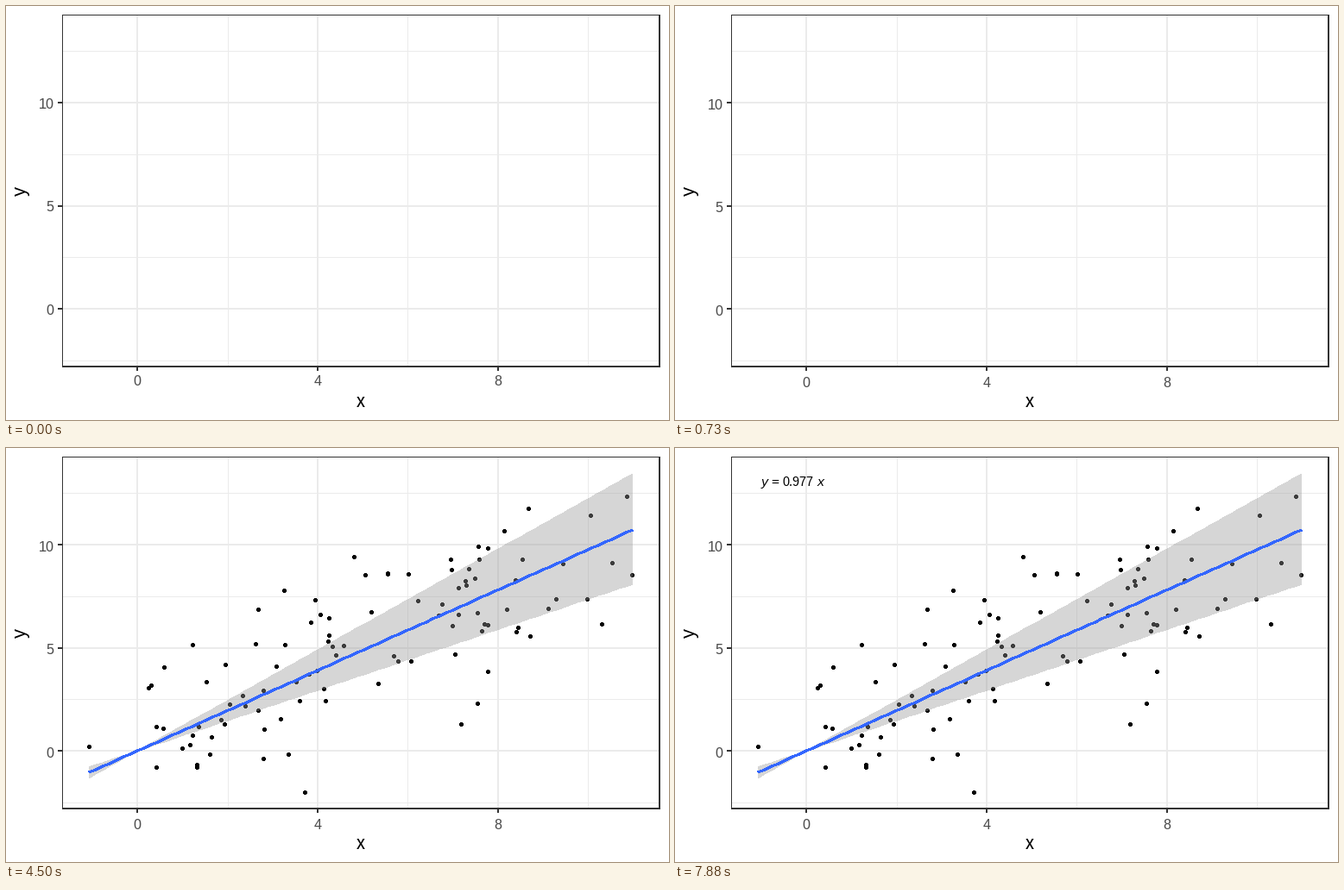
Animation of 768 by 480 pixels, one loop 8000 ms. Source, as a matplotlib script:

```python
import matplotlib.pyplot as plt
import numpy as np
from matplotlib.animation import FuncAnimation
from matplotlib.collections import PolyCollection

W, H, DPI = 768, 480, 96
LOOP, STEP = 8000, 10
PX = 72 / DPI  # points per pixel

# Times at which the plot changes, in ms
SETTLE, DOTS, FIT, EQUATION = 130, 1130, 4500, 7880

GRID, DARK, LABEL = "#EBEBEB", "#333333", "#4D4D4D"
X0, Y0 = 152, 351.3  # pixel position of the data origin

plt.rcParams.update({
    "font.family": "Liberation Sans",
    "text.hinting": "native",
    "text.hinting_factor": 1,
})

fig = plt.figure(figsize=(W / DPI, H / DPI), dpi=DPI, facecolor="white")
ax = fig.add_axes([0, 0, 1, 1])
ax.set(xlim=(0, W), ylim=(H, 0))
ax.set_axis_off()


def boxes(rects, color):
    """Fill crisp pixel rectangles given as (x, y, width, height)."""
    polys = [[(x, y), (x + w, y), (x + w, y + h), (x, y + h)]
             for x, y, w, h in rects]
    art = PolyCollection(polys, facecolors=color, edgecolors="none",
                         linewidths=0, antialiaseds=False)
    ax.add_collection(art, autolim=False)
    return art


def label(x, y, s, size, color="black", **kw):
    return ax.text(x, y, s, fontsize=size * PX, color=color,
                   va="baseline", **kw)


# Panel: grid, border and ticks
major_x, major_y = (151, 360, 569), (111, 231, 350)
boxes([(x, 11, 1, 406) for x in (257, 465, 674)]
      + [(66, y, 690, 1) for y in (52, 172, 291, 411)]
      + [(x, 11, 2, 406) for x in major_x]
      + [(66, y, 690, 2) for y in major_y], GRID)
boxes([(65, 10, 1, 409), (65, 10, 693, 1),
       (756, 10, 2, 409), (65, 417, 693, 2)]
      + [(x, 419, 2, 4) for x in major_x]
      + [(60, y, 5, 2) for y in major_y], DARK)

# Axis text
x_labels = [label(x + 1, 442, s, 17, LABEL, ha="center")
            for x, s in zip(major_x, "048")]
y_base = (120, 239, 359)
y_labels = [label(55.5, y, s, 17, LABEL, ha="right")
            for y, s in zip(y_base, ("10", "5", "0"))]
label(411, 465, "x", 22, ha="center")
label(23, 214.5, "y", 22, ha="center", rotation=90, rotation_mode="anchor")

# Observations, in pixels
xs = [96, 165, 168, 183, 174, 182, 174, 204, 213, 216,
      223, 216, 232, 221, 221, 236, 238, 249, 253, 254,
      259, 274, 277, 292, 289, 292, 298, 299, 298, 313,
      318, 327, 322, 323, 336, 340, 346, 351, 360, 353,
      358, 364, 368, 370, 374, 374, 373, 378, 382, 391,
      403, 416, 423, 431, 442, 442, 449, 454, 469, 466,
      477, 501, 505, 515, 516, 517, 520, 524, 524, 527,
      532, 533, 536, 543, 547, 548, 558, 546, 551, 554,
      558, 546, 558, 577, 580, 590, 591, 593, 598, 607,
      605, 628, 637, 645, 673, 677, 690, 702, 719, 725]
ys = [346, 278, 275, 254, 323, 325, 370, 348, 344, 333,
      323, 228, 271, 367, 370, 355, 335, 315, 320, 251,
      297, 287, 299, 304, 227, 187, 281, 326, 360, 253,
      314, 355, 165, 228, 271, 293, 399, 262, 258, 202,
      176, 193, 279, 293, 197, 217, 224, 230, 240, 229,
      126, 147, 190, 273, 145, 146, 241, 247, 247, 146,
      177, 194, 181, 129, 141, 206, 239, 162, 193, 320,
      154, 159, 140, 151, 114, 129, 116, 191, 212, 204,
      205, 296, 259, 96, 187, 153, 213, 208, 129, 218,
      70, 186, 175, 134, 175, 78, 204, 133, 56, 147]
dots = boxes([r for x, y in zip(xs, ys)
              for r in ((x - 2, y - 1, 5, 3), (x - 1, y - 2, 3, 5))], "black")

# Regression through the origin with its confidence band
fit_x = np.round(np.linspace(96, 725.6, 80))


def ray(slope):
    return np.round(Y0 - slope * (fit_x - X0))


band = ax.fill(np.r_[fit_x, fit_x[::-1]],
               np.r_[ray(0.560), ray(0.337)[::-1]],
               color="#999999", alpha=0.4, linewidth=0, antialiased=False)[0]
line = ax.plot(fit_x, ray(0.4469), color="#3366FF", linewidth=2 * PX,
               antialiased=False, solid_capstyle="butt", scalex=False,
               scaley=False)[0]

equation = [label(x, 44, s, 14.5, style=style) for x, s, style in (
    (100, "y", "italic"), (111, "=", "normal"),
    (124, "0.977", "normal"), (165, "x", "italic"))]

ax.set(xlim=(0, W), ylim=(H, 0))


def update(i):
    t = i * STEP
    lift = 1 if t < SETTLE else 0
    for text in x_labels:
        text.set_y(442 - 2 * lift)
    for text, y in zip(y_labels, y_base):
        text.set_y(y - lift)
    dots.set_visible(t >= DOTS)
    band.set_visible(t >= FIT)
    line.set_visible(t >= FIT)
    for text in equation:
        text.set_visible(t >= EQUATION)
    return []


anim = FuncAnimation(fig, update, frames=LOOP // STEP, interval=STEP,
                     repeat=True, repeat_delay=0, blit=False)
plt.show()
```
